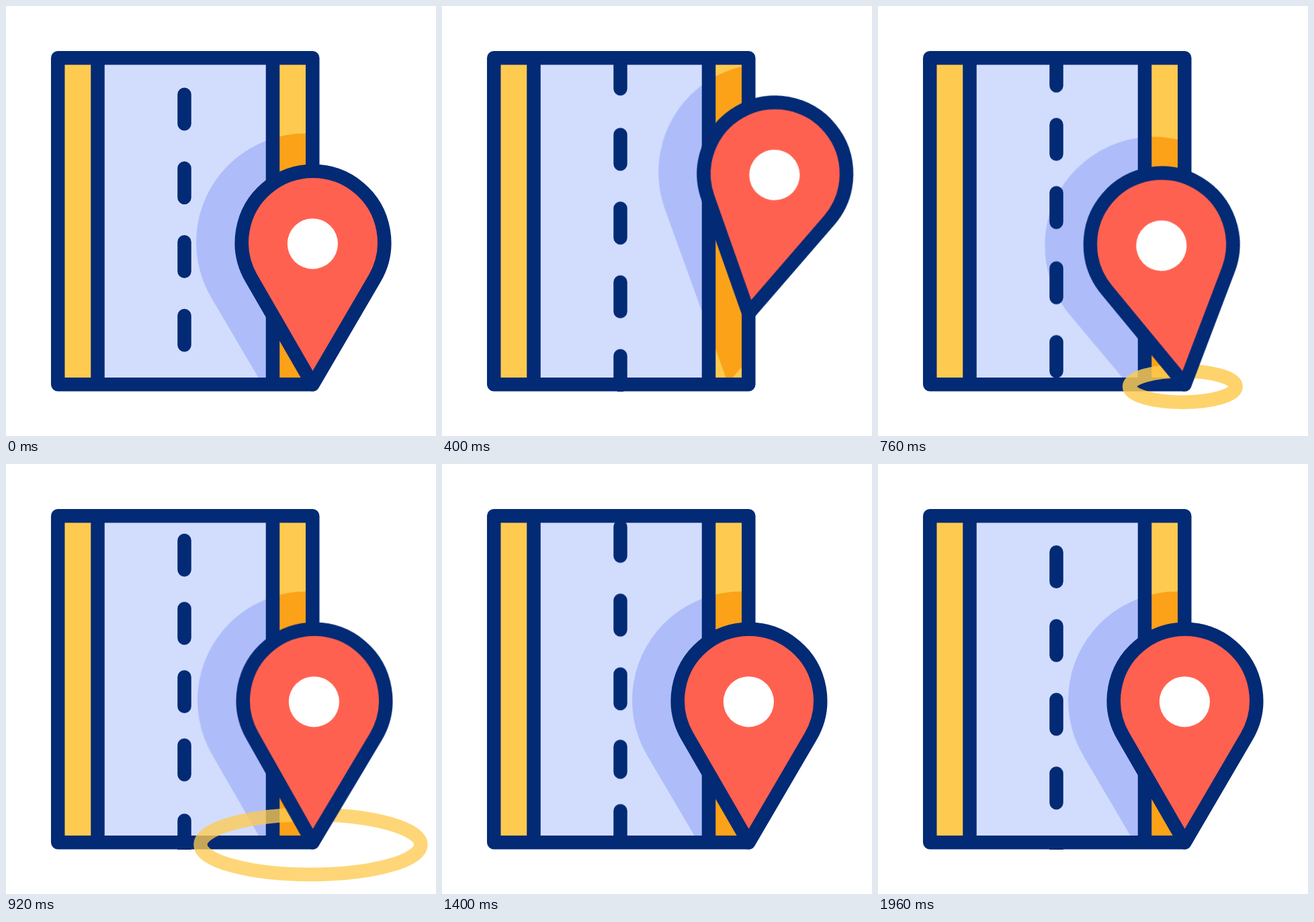
Recreate the animation shown at these times as an HTML page without scripts. Size 640x640 px, loop 2000 ms.

```html
<!DOCTYPE html>
<html lang="en">
<head>
<meta charset="utf-8">
<title>Road and map pin</title>
<style>
  :root {
    --navy: #032a75;
    --yellow: #fecb50;
    --ease: cubic-bezier(.5, 0, .5, 1);
  }
  html, body { margin: 0; width: 100%; height: 100%; overflow: hidden; background: #fff; }
  svg { display: block; width: 100%; height: 100%; }

  .line { fill: none; stroke: var(--navy); stroke-width: 20.5; stroke-linecap: round; stroke-linejoin: round; }
  .wide { stroke-dasharray: 43.5 66.3; }
  .tight { stroke-dasharray: 43.5 58.1; }

  .lift, .tilt, .lane, .ring { animation: 2s var(--ease) infinite; }
  .lift { animation-name: lift; }
  .tilt { animation-name: tilt; transform-origin: 456.5px 563.3px; }
  .lane { animation-name: lane; animation-timing-function: cubic-bezier(.51, 0, .49, 1); }
  .ring { animation-name: grow, fade; fill: none; stroke: var(--yellow); stroke-width: 20.5; }

  @keyframes lift {
    0%, 36%, 100% { transform: translateY(0); }
    18% { transform: translateY(-108px); }
  }
  @keyframes tilt {
    0%, 56%, 100% { transform: rotate(0deg); }
    14% { transform: rotate(13.7deg); }
    36% { transform: rotate(-10deg); }
    48% { transform: rotate(1deg); }
  }
  @keyframes lane {
    from { transform: translateY(0); }
    to { transform: translateY(949.5px); }
  }
  @keyframes grow {
    0%, 24% { rx: 7px; ry: 5px; }
    56%, 100% { rx: 197px; ry: 53px; }
  }
  @keyframes fade {
    0% { opacity: 0; }
    28% { opacity: 0; animation-timing-function: linear; }
    40%, 40.75% { opacity: 1; }
    56%, 100% { opacity: 0; }
  }
</style>
</head>
<body>
<svg viewBox="0 0 640 640">
  <defs>
    <clipPath id="road"><rect x="136.5" y="77" width="260.5" height="486"/></clipPath>
    <clipPath id="verge"><rect x="397" y="77" width="59" height="486"/></clipPath>
    <clipPath id="span"><rect x="240" y="67" width="50" height="506.5"/></clipPath>
    <path id="shade" d="M445 671 L305.6 434.3 A162 162 0 1 1 584.4 434.3 Z"/>
  </defs>

  <rect x="77" y="77" width="379" height="486" fill="#fecb50"/>
  <rect x="136.5" y="77" width="260.5" height="486" fill="#d2ddfe"/>

  <g clip-path="url(#road)">
    <g class="lift"><g class="tilt"><use href="#shade" fill="#aebdfa"/></g></g>
  </g>
  <g clip-path="url(#verge)">
    <g class="lift"><g class="tilt"><use href="#shade" fill="#fca218"/></g></g>
  </g>

  <!-- lane marks: two wide runs joined by a tighter one -->
  <g clip-path="url(#span)">
    <g class="lane line">
      <path class="wide" d="M265.5 131.7 V504.7"/>
      <path class="tight" d="M265.5 63.3 V-380.7"/>
      <path class="wide" d="M265.5 -817.8 V-444.8"/>
    </g>
  </g>

  <path class="line" d="M77.2 77.3 H456.3 V563.3 H77.2 Z M136.5 77.3 V563.3 M397 77.3 V563.3"/>

  <ellipse class="ring" cx="453.4" cy="566.4" rx="7" ry="5"/>

  <g class="lift">
    <g class="tilt">
      <path class="line" style="fill:#ff6150" d="M456.5 563.3 L365.2 405.4 A106.2 106.2 0 1 1 548.8 405.4 Z"/>
      <circle cx="456.4" cy="353.8" r="37.6" fill="#fff"/>
    </g>
  </g>
</svg>
</body>
</html>
```
